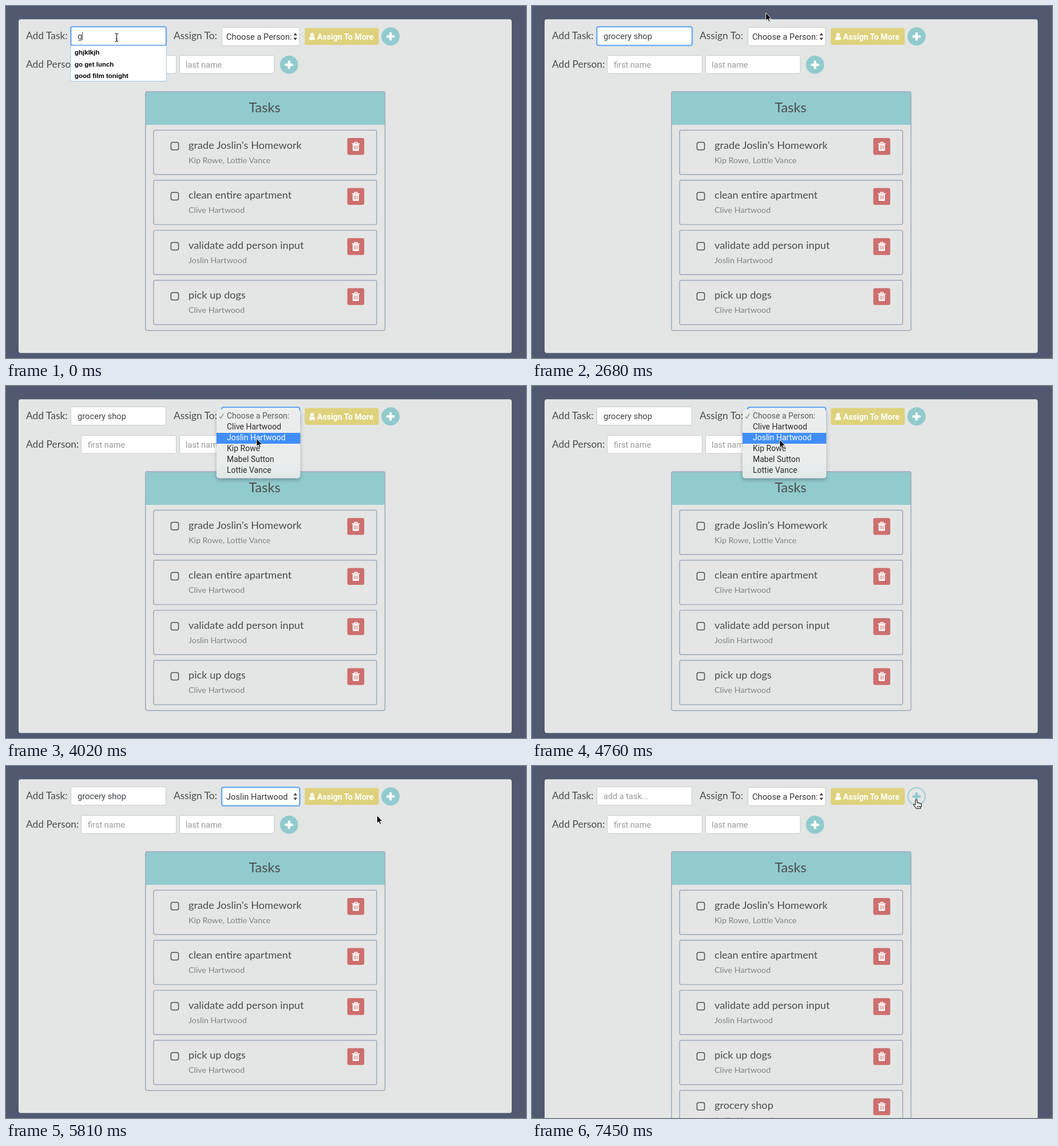
Animation of 909 by 616 pixels, one loop 8000 ms. Source, as an HTML page:

```html
<!DOCTYPE html>
<html lang="en">
<head>
<meta charset="utf-8">
<title>Task list</title>
<style>
  html, body { margin: 0; width: 100%; height: 100%; overflow: hidden; background: #50596f; }
  svg { display: block; width: 909px; height: 616px; }
  text { white-space: pre; font-family: Roboto, "Liberation Sans", sans-serif; fill: #3f4448; }
  .hand { font-family: Lato, "Open Sans", sans-serif; fill: #4c4d4e; }
  .label { font-size: 17.4px; }
  .head { font-size: 23.5px; text-anchor: middle; }
  .title { font-size: 18.2px; }
  .sub { font-size: 14.3px; fill: #828382; }
  .value { font-size: 14.7px; }
  #person { fill: #33373a; }
  .hint { font-size: 14.5px; fill: #999; }
  .btn { font-size: 14.1px; font-weight: 700; fill: #fff; }
  .item { font-size: 14px; fill: #2c2c2c; }
  .suggest { font: 700 11.5px "Liberation Sans", Arial, sans-serif; fill: #000; }
  .field { fill: #fff; stroke: #c6cacd; }
  .ring { fill: none; stroke: #74aeee; stroke-width: 2.6; }
  .frame { fill: none; stroke: #a6b0be; stroke-width: 1.7; }
  #menuBox { filter: drop-shadow(0 3px 3px #0004); }
</style>
</head>
<body>
<svg viewBox="0 0 909 616">
  <defs>
    <linearGradient id="glass" x2="0" y2="1">
      <stop offset=".75" stop-color="#ebedec"/>
      <stop offset="1" stop-color="#dfe9e9"/>
    </linearGradient>
  </defs>

  <rect id="panel" x="22" y="23.2" width="862" height="584" rx="4" fill="#e4e6e5"/>

  <text class="hand label" x="35" y="57.5">Add Task:</text>
  <text class="hand label" x="293" y="57.5">Assign To:</text>
  <text class="hand label" x="35" y="107.5">Add Person:</text>

  <rect class="field" x="113.5" y="36.5" width="166" height="32" rx="3"/>
  <rect id="taskRing" class="ring" x="113.3" y="36.3" width="166.7" height="32.7" rx="3"/>
  <text id="task" x="125" y="58"></text>
  <path id="caret" d="M0 45.5V60" stroke="#333"/>

  <rect class="field" x="377.5" y="37.5" width="135.5" height="32" rx="3"/>
  <rect id="personRing" class="ring" x="377" y="37.2" width="136.5" height="32.5" rx="3"/>
  <text id="person" class="value" x="385" y="58.5"></text>
  <path d="M502.5 51.5l3.3-4.5 3.3 4.5zM502.5 55.5l3.3 4.5 3.3-4.5z" fill="#444"/>

  <rect x="522.3" y="38.5" width="129.3" height="29.6" rx="3" fill="#dfd27c"/>
  <path d="M530 58.6q-.2-5 2.8-5.4 2.2 1.5 4.4 0 3 .4 2.8 5.4-.3 1-1.4 1h-7.2q-1.2 0-1.4-1z" fill="#fff"/>
  <circle cx="535" cy="50.3" r="3.2" fill="#fff"/>
  <text class="btn" x="544" y="58.5">Assign To More</text>

  <rect class="field" x="131.5" y="86.5" width="166" height="31.5" rx="3"/>
  <rect class="field" x="303.5" y="86.5" width="165.5" height="31.5" rx="3"/>
  <text class="hint" x="143" y="107.5">first name</text>
  <text class="hint" x="314" y="107.5">last name</text>

  <g id="plusTop" transform="translate(672.2 53.3)"></g>
  <g id="plusLow" transform="translate(494.8 102.8)"></g>

  <rect x="244" y="150" width="418.5" height="58" fill="#92cbcd"/>
  <rect id="list" class="frame" x="243.8" y="149.8" width="418.7" rx="3"/>
  <text class="hand head" x="452" y="186">Tasks</text>
  <g id="rows"></g>

  <g id="suggest">
    <rect x="112.9" y="69.5" width="167.4" height="62" fill="#fff" stroke="#a3c6e6"/>
  </g>

  <g id="menu">
    <rect id="menuBox" x="368" y="41" width="146.5" height="120.5" rx="5" fill="url(#glass)"/>
    <rect id="pick" x="368" width="146.5" height="19" fill="#418efb"/>
    <path d="M373 53.5l2.5 3 4.5-8" fill="none" stroke="#8b8d8e" stroke-width="1.5"/>
  </g>

  <g id="pointer">
    <path d="M-3 -7Q0 -7 0 -5Q0 -7 3 -7M0 -5.5V5.5M-3 7Q0 7 0 5Q0 7 3 7M-1.7 2.5H1.7" fill="none" stroke="#222" stroke-width="1.2"/>
    <path d="M0 0V13.8L3.1 10.9 5.3 15.8 7.4 14.9 5.3 10.2H9.6Z" fill="#000" stroke="#fff" stroke-width=".9"/>
    <path d="M-1.5 9V1.5a1.5 1.5 0 0 1 3 0V5.5q2.6-1 2.8.6 2.4-.8 2.6.8 2.3-.5 2.3 1.5 0 3.2-1.7 5.3V15.5H.3Q-1.5 12.5-4.2 9.8C-5.6 8-3.4 6.6-1.5 9ZM2 11v2.5M4.2 11v2.5M6.2 11v2.5" fill="#fff" stroke="#111" stroke-width="1.1" stroke-linejoin="round"/>
  </g>
</svg>

<script>
const LOOP = 8000, PITCH = 87.6, TEAL = '#92cbcd';
const PROMPT = 'Choose a Person:', TASK = 'grocery shop', PICKED = 'Joslin Hartwood';
const people = ['Clive Hartwood', PICKED, 'Kip Rowe', 'Mabel Sutton', 'Lottie Vance'];
const tasks = [
  ["grade Joslin's Homework", 'Kip Rowe, Lottie Vance'],
  ['clean entire apartment', 'Clive Hartwood'],
  ['validate add person input', PICKED],
  ['pick up dogs', 'Clive Hartwood'],
  [TASK, PICKED]
];

const $ = id => document.getElementById(id);
const add = (id, markup) => $(id).insertAdjacentHTML('beforeend', markup);
const show = (el, on) => { el.style.display = on ? '' : 'none'; };
const set = (id, attrs) => { for (const k in attrs) $(id).setAttribute(k, attrs[k]); };

for (const id of ['plusTop', 'plusLow'])
  add(id, `<circle r="16" fill="${TEAL}"/><circle r="14.2" fill="#e4e6e5" opacity="0"/>
    <path d="M-6.6 0H6.6M0 -6.6V6.6" stroke="#fff" stroke-width="4.2"/>
    <path d="M-7.3 0H7.3M0 -7.3V7.3" stroke="#fff" stroke-width="2.8"/>`);

tasks.forEach(([title, who], i) => add('rows', `
  <g transform="translate(0 ${i * PITCH})">
    <rect class="frame" x="258" y="217.3" width="390" height="77.6" rx="3"/>
    <rect x="288.4" y="238.6" width="13.2" height="13.2" rx="3" fill="none" stroke="#4f5152" stroke-width="1.5"/>
    <text class="hand title" x="319" y="249.5">${title}</text>
    <text class="hand sub" x="319" y="274.5">${who}</text>
    <rect x="596.6" y="231" width="29.6" height="29.5" rx="3" fill="#cd6f6e"/>
    <path d="M604.5 241H618.5M608.5 240.5L609.5 238.5H613.5L614.5 240.5" fill="none" stroke="#fff" stroke-width="1.5"/>
    <path d="M606 242H617V252Q617 253.5 615.5 253.5H607.5Q606 253.5 606 252Z" fill="#fff"/>
    <path d="M608.8 243.8V251M611.5 243.8V251M614.2 243.8V251" stroke="#cd6f6e" stroke-width="1.1"/>
  </g>`));

['ghjklkjh', 'go get lunch', 'good film tonight'].forEach((s, i) =>
  add('suggest', `<text class="suggest" x="120" y="${85.3 + i * 20.5}">${s}</text>`));

[PROMPT, ...people].forEach((s, i) =>
  add('menu', `<text class="item" x="386" y="${57.3 + i * 19}">${s}</text>`));

// Each entry: start time, then the value held until the next entry.
const typed = [[0, 1], [150, 2], [300, 3], [445, 4], [595, 5], [740, 6], [890, 7],
  [1040, 8], [1340, 10], [1640, 11], [1790, 12]];
const picks = [[0, 0], [3880, 1], [4020, 2], [4170, 3], [4610, 2]];
const hover = [[0, 0], [6260, .5], [6400, 1]];
const IBEAM = 0, ARROW = 1, HAND = 2;
const path = [
  [0, IBEAM, 193.5, 55], [2390, ARROW, 310, 28], [2540, ARROW, 378, 6],
  [2680, ARROW, 408.7, 11.8], [2830, ARROW, 428, 28], [2980, ARROW, 438, 42],
  [3130, ARROW, 441, 49], [3880, ARROW, 440, 72], [4020, ARROW, 438, 92],
  [4170, ARROW, 436, 107], [4470, ARROW, 434, 103], [4610, ARROW, 433, 97],
  [4760, ARROW, 433, 94], [5360, ARROW, 455, 96], [5510, ARROW, 525, 98],
  [5660, ARROW, 603, 95], [5810, ARROW, 648.5, 86.5], [5960, ARROW, 664, 73],
  [6110, HAND, 670, 63], [6260, HAND, 671, 60], [6400, HAND, 671.7, 59]
];
const at = (track, t) => track.findLast(k => k[0] <= t).slice(1);

const pointers = [...$('pointer').children];
const menuItems = [...$('menu').querySelectorAll('text')];
const [, inner, ...cross] = $('plusTop').children;

function draw(t) {
  const sent = t >= 7300, open = t >= 3280 && t < 5210;

  $('task').textContent = sent ? 'add a task...' : TASK.slice(0, at(typed, t)[0]);
  $('task').setAttribute('class', sent ? 'hint' : 'value');
  show($('taskRing'), t < 3280);
  show($('caret'), t < 2390);
  set('caret', { transform: `translate(${125.5 + $('task').getComputedTextLength()} 0)` });
  show($('suggest'), t < 150);

  $('person').textContent = t >= 5210 && !sent ? PICKED : PROMPT;
  show($('personRing'), t >= 3280 && !sent);
  show($('menu'), open);
  const pick = at(picks, t)[0];
  show($('pick'), pick > 0);
  set('pick', { y: 44 + pick * 19 });
  menuItems.forEach((el, i) => {
    el.style.fill = i === 0 ? '#595b5c' : i === pick ? '#fff' : '';
  });

  const glow = at(hover, t)[0];
  inner.setAttribute('opacity', glow);
  cross.forEach(el => el.setAttribute('stroke', glow > .5 ? TEAL : '#fff'));

  const extra = t >= 7450 ? PITCH : 0;
  set('panel', { height: 584 + extra });
  set('list', { height: 418 + extra });
  show($('rows').lastElementChild, extra);

  const [kind, x, y] = at(path, t);
  pointers.forEach((el, i) => show(el, i === kind));
  set('pointer', { transform: `translate(${x} ${y})` });
}

const start = performance.now();
function tick() {
  draw((performance.now() - start) % LOOP);
  requestAnimationFrame(tick);
}
tick();
</script>
</body>
</html>
```
